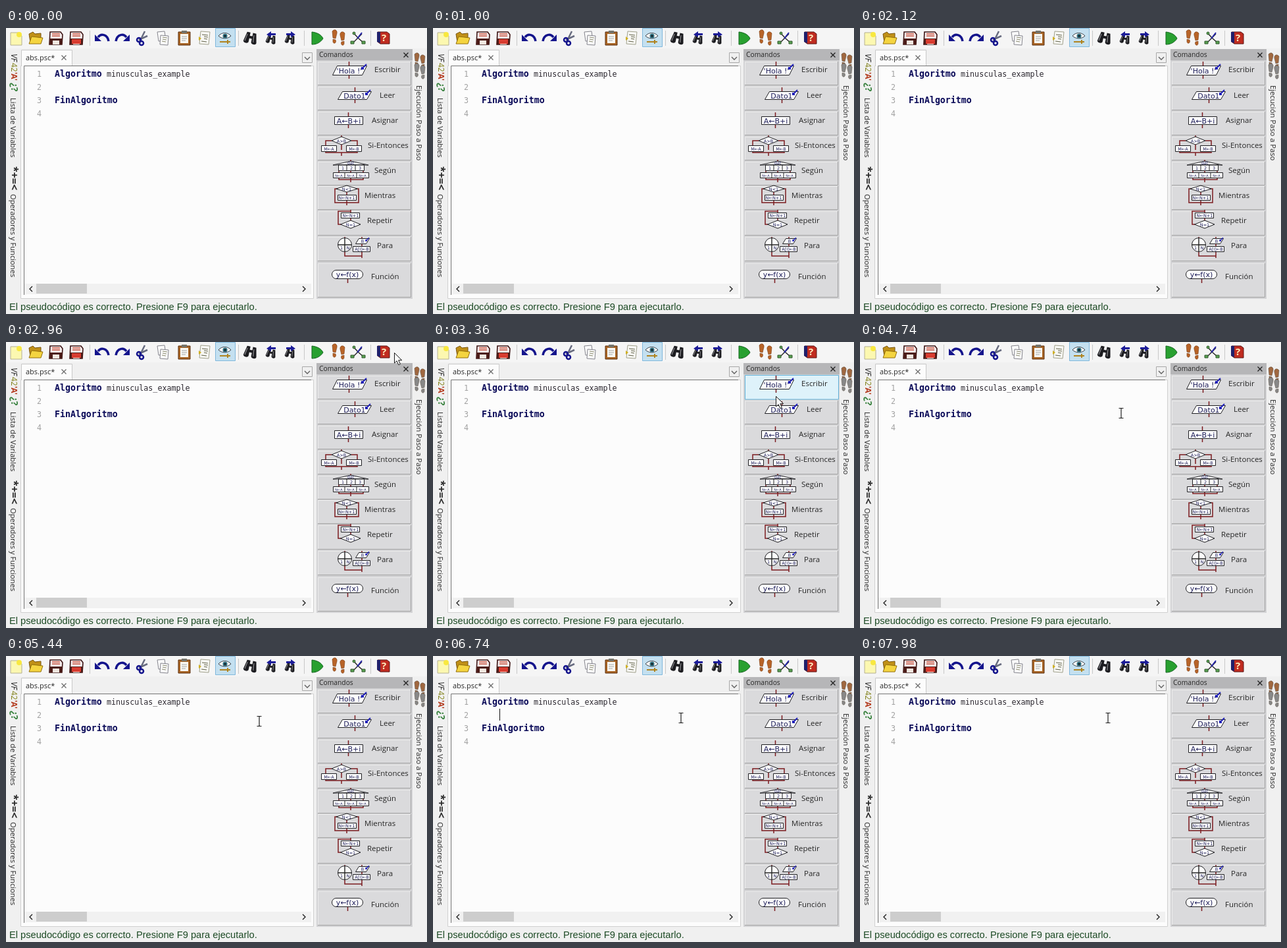
An HTML page that plays this animation: 640x434 px, repeating every 8000 ms.

```html
<!DOCTYPE html>
<html lang="es">
<head>
<meta charset="utf-8">
<title>Editor de pseudocódigo</title>
<style>
  html, body { margin: 0; width: 100%; height: 100%; overflow: hidden; background: #f0f0f0; }
  svg { display: block; width: 640px; height: 434px; }
  text { font: 11.2px "Open Sans", "Noto Sans", sans-serif; fill: #262626; white-space: pre; }
  .mono { font: 11.7px "DejaVu Sans Mono", monospace; fill: #2c2830; }
  .key { font: bold 13.25px "DejaVu Sans Mono", monospace; fill: #0a0a58; }
  .num { font: 11.7px "DejaVu Sans Mono", monospace; fill: #a2a2a2; }
  .status { font: 14.65px "Liberation Sans", Arial, sans-serif; fill: #1c4a24; }
  .label { font-size: 11.5px; }
  .flow text { font: 11px "DejaVu Sans", sans-serif; fill: #20205c; text-anchor: middle; }
  .flow .tiny { font-size: 6.5px; }
  .box { fill: #fcfcfc; stroke: #202024; }
  .wire { fill: none; stroke: #7c1c20; stroke-width: 1.5; }
  .pen { fill: none; stroke: #2020b8; stroke-width: 2; }
  .line { fill: none; stroke: #242424; stroke-width: 1.4; }
</style>
</head>
<body>
<svg viewBox="0 0 640 434">
  <defs>
    <g id="floppy">
      <path d="M-9-9H7l3 4-1 15H-10Z" fill="#f4ecec" stroke="#3c1414" stroke-width="1.600"/>
      <path d="M-10 1H10L9 10H-10Z" fill="#4c1c18"/>
      <path d="M-5 4H5v6H-5Z" fill="#f0e8e0"/>
      <path d="M-6-6H6M-6-3H6" stroke="#c8503c" stroke-width="1.500"/>
    </g>
    <g id="undo">
      <path d="M-7-1C-3-7 7-6 9 5" fill="none" stroke="#14148c" stroke-width="3.500"/>
      <path d="M-12-5V5H-2Z" fill="#14148c"/>
    </g>
    <g id="binoculars" fill="#1c1c20" transform="rotate(12)">
      <path d="M-7-8h5v5h4v-5h5l3 14c0 4-8 4-8 0V1h-4v5c0 4-8 4-8 0Z"/>
      <path d="M-6-5-8 6M4-5 5 6" stroke="#8c8c90" stroke-width="1.200"/>
    </g>
    <g id="sole">
      <path d="M-4-8c3-4 8-2 7 3L1 3-3 2Z"/>
      <path d="M-3 4 1 5C3 10-2 12-3 8Z"/>
    </g>
    <path id="cross" class="line" d="M-3.5-3.5 3.5 3.5M3.5-3.5-3.5 3.5"/>
    <path id="pen" class="pen" d="M7-4 0 3M0 0V3H3"/>
  </defs>

  <rect width="640" height="434" fill="#f0f0f0"/>
  <rect width="640" height="31" fill="#f5f5f5"/>
  <path d="M127.500 4V27M353.500 4V27M453.500 4V27M554.500 4V27" stroke="#c8c8c8"/>

  <!-- toolbar -->
  <g transform="translate(15 15)">
    <path d="M-8-8H4l5 5V11H-8Z" fill="#fcf8b0" stroke="#b4b090"/>
    <circle cx="5" cy="-5" r="4" fill="#f8e840"/>
  </g>
  <g transform="translate(45 15)">
    <path d="m-10-6 6-3 3 3 9-1V7H-8Z" fill="#c09018" stroke="#785410"/>
    <path d="M-6-2 11 0 8 9H-10Z" fill="#f4d440" stroke="#94700c"/>
  </g>
  <use href="#floppy" x="76" y="15"/>
  <use href="#floppy" x="107" y="15"/>
  <path d="M100 17h14v7h-14Z" fill="#d83c30"/>
  <use href="#undo" x="147" y="15"/>
  <use href="#undo" transform="translate(176 15) scale(-1 1)"/>
  <g transform="translate(207 15)">
    <path d="M4-10-3 4M8-3-5 3" stroke="#686c80" stroke-width="2.500"/>
    <g fill="none" stroke="#14148c" stroke-width="2.500"><circle cx="-5" cy="3" r="3"/><circle cx="-1" cy="8" r="3"/></g>
  </g>
  <g transform="translate(239 15)" fill="#fafafa" stroke="#84848c">
    <path d="m-9-9 11-1 2 14-11 1Z"/><path d="m-4-4 12 1-1 14-12-1Z"/>
    <path d="M-1-1 6 0M-1 2l6 1M-2 5l6 1" stroke="#8c8c70"/>
  </g>
  <g transform="translate(271 15)">
    <path d="M-9-9H9V11H-9Z" fill="#a86424" stroke="#5c3010"/>
    <path d="M-6-6H6V8H-6Z" fill="#f8f8f4"/><path d="M-4-11H4v4h-8Z" fill="#74746c"/>
    <path d="M-4-2H4M-4 1H4M-4 4H2" stroke="#a4a4a4"/>
  </g>
  <g transform="translate(302 15)">
    <path d="m-6-10 14 1-2 19-14-1Z" fill="#f8f8f4" stroke="#a0a08c"/>
    <path d="m-4-5 9 1M-1-2l6 1M-1 1l5 1M-5 5l8 1" stroke="#606048"/>
    <path d="m-9-2 4 3-4 3Z" fill="#d0b020"/>
  </g>
  <path d="M318.500.5h30v28h-30Z" fill="#c4e0f0" stroke="#80b8dc"/>
  <g transform="translate(333 13)">
    <path d="M-10-1C-5-7 4-7 9-1 4 4-5 4-10-1Z" fill="#f8f8f8" stroke="#3c444c"/>
    <circle cy="-1" r="3.500" fill="#307080"/><circle cy="-1" r="1.500" fill="#101418"/>
    <path d="M-8 8H8M4 5v6" stroke="#b08420" stroke-width="2"/>
  </g>
  <use href="#binoculars" x="372" y="15"/>
  <use href="#binoculars" transform="translate(403 17) scale(.75)"/>
  <path d="M410 8h-7V5l-7 5 7 4v-3h7Z" fill="#1c1c98"/>
  <use href="#binoculars" transform="translate(432 17) scale(.75)"/>
  <path d="M426 8h7V5l7 5-7 4v-3h-7Z" fill="#1c1c98"/>
  <path d="M465 6c9 1 15 5 17 10-4 6-10 9-17 9Z" fill="#28a030" stroke="#146420"/>
  <g fill="#b86428" stroke="#783c14" stroke-width=".6">
    <use href="#sole" x="500" y="13"/><use href="#sole" transform="translate(511 16) scale(-1 1)"/>
  </g>
  <g transform="translate(535 15)">
    <path d="M-7-8 0 0 6-6M0 0-8 8M0 0 8 7" class="line"/>
    <g fill="#58a050" stroke="#30582c"><circle cx="-6" cy="-7" r="2"/><path d="M-11 5h5v4h-5ZM6 5h5v4H6Z"/></g>
    <path d="M6-8-1 1" stroke="#2424a8" stroke-width="2"/>
  </g>
  <path d="M565 6h14l4 3v15h-14l-4-3Z" fill="#c02c20" stroke="#581414"/>
  <path d="M564 6h5v17l-5-2Z" fill="#20206c"/>
  <text x="571" y="20" style="font-size:15px;font-weight:bold;fill:#fff0c0">?</text>

  <!-- side tabs -->
  <g transform="translate(8 39) rotate(90)">
    <text style="font-size:12px;font-style:italic">VF</text>
    <text x="14" style="font-size:12px;fill:#808018">42</text>
    <text x="28" style="font-size:12px;font-weight:bold;fill:#b43c20">'A'</text>
    <text x="44" style="font-size:14px;font-weight:bold;fill:#36803c">¿?</text>
  </g>
  <text transform="translate(7 106) rotate(90)">Lista de Variables</text>
  <text transform="translate(7 210) rotate(90)" style="font-size:16px;font-weight:bold">*+=&lt;</text>
  <text transform="translate(7 252) rotate(90)">Operadores y Funciones</text>
  <g stroke="#54483c" stroke-width=".5">
    <g fill="#a06840"><use href="#sole" x="625" y="48"/><use href="#sole" transform="translate(633 51) scale(-1 1)"/></g>
    <g fill="#888"><use href="#sole" x="625" y="64"/><use href="#sole" transform="translate(633 67) scale(-1 1)"/></g>
  </g>
  <text transform="translate(624 87) rotate(90)">Ejecución Paso a Paso</text>

  <!-- editor -->
  <path d="M22.500 57.500H467.500V410.500H22.500Z" fill="#fcfcfc" stroke="#d0d0d0"/>
  <path d="M23.500 58V33.500H100.500V58" fill="#fcfcfc" stroke="#c8c8c8"/>
  <path d="M27.500 405V57.500H464" fill="none" stroke="#747474"/>
  <text x="30" y="49" style="font-size:11px">abs.psc*</text>
  <use href="#cross" x="88" y="45" opacity=".65"/>
  <path d="M450.500 37.500h15v15h-15Z" fill="#f0f0f0" stroke="#a8a8a8"/>
  <path d="m454 44 4 4 4-4" class="line" opacity=".7"/>
  <rect x="28" y="388" width="436" height="16" fill="#f1f1f1"/>
  <rect x="46" y="388" width="77" height="15" fill="#cdcdcd"/>
  <path d="m40 392-4 4 4 4M451 392l4 4-4 4" class="line"/>
  <g id="numbers"></g>
  <text class="key" x="74" y="74">Algoritmo</text>
  <text class="mono" x="153" y="74">minusculas_example</text>
  <text class="key" x="74" y="114">FinAlgoritmo</text>
  <path id="caret" d="M101.500 80V98" stroke="#101010"/>

  <!-- command panel -->
  <rect x="472" y="32" width="146" height="379" fill="#d2d2d4"/>
  <rect x="472" y="32" width="146" height="17" fill="#b6b6b8"/>
  <text x="476" y="44" style="font-size:10.3px">Comandos</text>
  <use href="#cross" x="608" y="41"/>
  <g id="rows"></g>
  <path id="hover" d="M474.500 50.500H616.500V87H474.500Z" fill="#def2fa" stroke="#64b4dc"/>
  <g id="labels"></g>

  <g class="flow">
    <path class="wire" d="M521.500 51v6M521.500 72v5M530.500 90v6M530.500 109v5M520.500 128v6M520.500 147v5M519.500 381v6"/>
    <path class="box" d="M503.500 57.500h45l-7 14h-45ZM511.500 96.500h44l-7 12h-44ZM499.500 134.500h43v12h-43Z"/>
    <rect class="box" x="495.500" y="367.500" width="47" height="13" rx="6.500"/>
    <text x="522" y="69">'Hola !'</text>
    <text x="530" y="107">Dato1</text>
    <text x="521" y="145">A←B+i</text>
    <text x="519" y="378">y←f(x)</text>
    <use href="#pen" x="541" y="59"/><use href="#pen" x="547" y="98"/>

    <path class="wire" d="M510 163v22M495 171h-9v18h48v-18h-9M510 189v5"/>
    <path class="box" d="m495 171 15-6 15 6-15 6ZM479.500 178.500h23v9h-23ZM517.500 178.500h23v9h-23Z"/>
    <text class="tiny" x="510" y="173.500">A&gt;B</text>
    <text class="tiny" x="491" y="186">M←A</text><text class="tiny" x="529" y="186">M←B</text>

    <path class="wire" d="M524 200v5M506 216v14h37v-14M524 216v18"/>
    <path class="box" d="m497 208 27-6 27 6ZM505.500 207.500h39v9h-39ZM518 208v8M531 208v8M497.500 219.500h54v8h-54ZM515 220v7M533 220v7"/>
    <text class="tiny" x="524" y="207">dat</text>
    <text class="tiny" x="512" y="214.500">1</text><text class="tiny" x="525" y="214.500">2</text><text class="tiny" x="538" y="214.500">3</text>
    <g id="cases"></g>

    <path class="wire" d="M518 239v26h-18v-21h36v21h-18v4"/>
    <path class="box" d="m502 244 16-5 16 5-16 5ZM504.500 253.500h28v8h-28Z"/>
    <text class="tiny" x="518" y="246.500">N&lt;1</text><text class="tiny" x="518" y="260">N←N+1</text>

    <path class="wire" d="M524 276v28M509 298h-4v-20h19"/>
    <path class="box" d="M509.500 280.500h28v8h-28Zm-1 17.500 15.500-6 15 6-15 6Z"/>
    <text class="tiny" x="524" y="287">N←N+1</text><text class="tiny" x="524" y="300.500">N=1</text>

    <path class="wire" d="M515 317v29h26v-29M541 345v4"/>
    <circle class="box" cx="515" cy="329" r="10.500"/>
    <path class="line" d="M515 319v20M505 329h20"/>
    <path class="box" d="M536.500 319.500h16l-5 8h-16ZM527.500 331.500h26v8h-26Z"/>
    <text class="tiny" x="510" y="336">1</text><text class="tiny" x="520" y="336">N</text>
    <text class="tiny" x="542" y="326">B</text><text class="tiny" x="541" y="338">A[I]←B</text>
    <use href="#pen" transform="translate(547 321) scale(.7)"/>
  </g>

  <text class="status" x="5" y="428">El pseudocódigo es correcto. Presione F9 para ejecutarlo.</text>
  <path id="arrow" d="M.5.5V16l3.600-3.300 2.700 6 2.600-1.200-2.700-5.800h5Z" fill="#fff" stroke="#181818"/>
  <path id="beam" d="M-3.500-7.500h3L0-6.500.5-7.500h3M0-7V7M-3.500 7.500h3L0 6.500.5 7.500h3" fill="none" stroke="#202020" stroke-width="1.200"/>
</svg>
<script>
  const LOOP = 8000, CARET_START = 6300, BLINK = 530;
  const el = id => document.getElementById(id);
  const fill = (id, items, markup) => { el(id).innerHTML = items.map(markup).join(""); };

  // name, label x, label baseline, row top, row bottom
  const commands = [
    ["Escribir", 560, 67, 51, 86], ["Leer", 568, 106, 89, 124],
    ["Asignar", 556, 144, 127, 162], ["Si-Entonces", 550, 182, 165, 200],
    ["Según", 560, 220, 203, 238], ["Mientras", 545, 258, 240, 275],
    ["Repetir", 549, 296, 278, 314], ["Para", 564, 334, 317, 353],
    ["Función", 555, 381, 357, 408]
  ];
  fill("rows", commands, ([, , , top, bottom]) =>
    `<path d="M474.500 ${top}.5H615.500V${bottom}.5H474.500Z" fill="#dadadc" stroke="#ececec"/>
     <path d="M474 ${bottom}.5H615.500V${top}" fill="none" stroke="#a4a4a4"/>`);
  fill("labels", commands, ([name, x, y]) => `<text class="label" x="${x}" y="${y}">${name}</text>`);
  fill("numbers", [1, 2, 3, 4], n => `<text class="num" x="47" y="${54 + 20 * n}">${n}</text>`);
  fill("cases", [506, 524, 542], x => `<text class="tiny" x="${x}" y="226" style="font-size:5px">N←A</text>`);

  // time, x, y of the pointer
  const path = [
    [2800, 620, -12], [3340, 521, 82], [3380, 521, 82], [3900, 447, 106],
    [4120, 417, 108], [5020, 388, 108], [5440, 385, 99.5], [5640, 377, 94]
  ];

  function pointerAt(t) {
    const next = path.findIndex(p => p[0] > t);
    if (next < 0) return path.at(-1).slice(1);
    if (next === 0) return null;
    const [t0, x0, y0] = path[next - 1], [t1, x1, y1] = path[next];
    const k = (t - t0) / (t1 - t0);
    return [Math.round(x0 + (x1 - x0) * k), Math.round(y0 + (y1 - y0) * k)];
  }

  const show = (id, on) => el(id).setAttribute("visibility", on ? "visible" : "hidden");
  const start = performance.now();

  function draw() {
    const t = (performance.now() - start) % LOOP;
    const pointer = pointerAt(t);
    const [x, y] = pointer || [0, 0];
    const inEditor = x < 468;
    for (const id of ["arrow", "beam"]) {
      el(id).setAttribute("transform", `translate(${x} ${y})`);
      show(id, pointer && (id === "beam") === inEditor);
    }
    show("hover", pointer && x >= 474 && x <= 617 && y >= 50 && y <= 87);
    show("caret", t >= CARET_START && Math.floor((t - CARET_START) / BLINK) % 2 === 0);
    requestAnimationFrame(draw);
  }
  draw();
</script>
</body>
</html>
```
